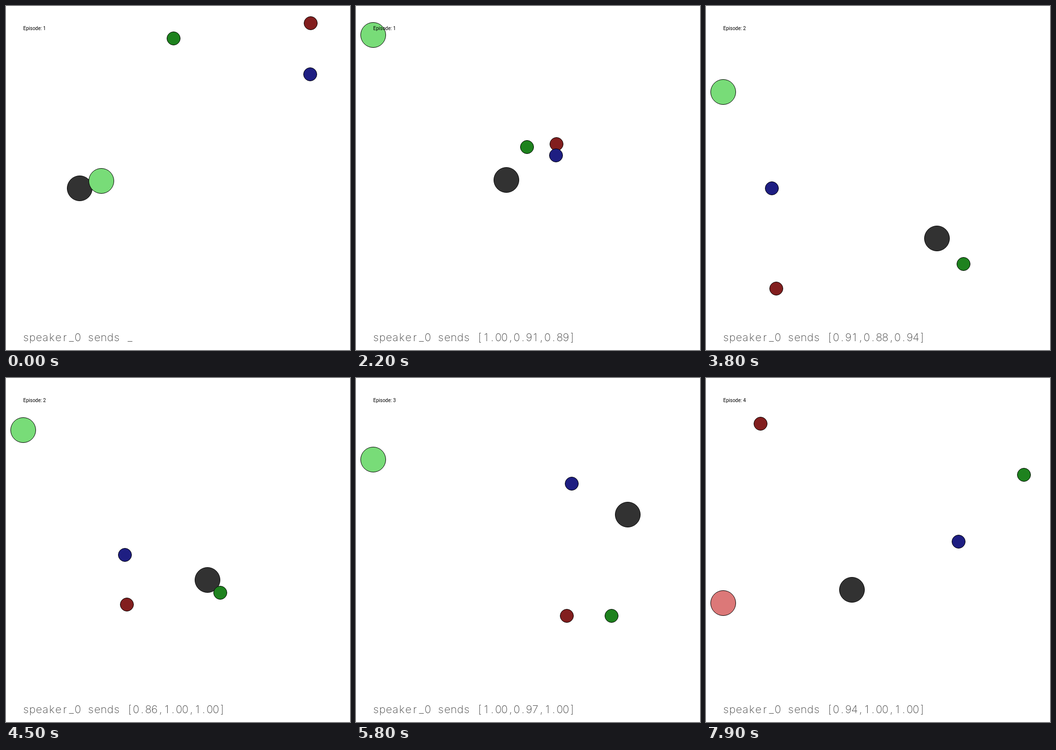
Animation, 700 px wide and 700 px high, one loop 8000 ms. Source, as an HTML page with a canvas:

```html
<!DOCTYPE html>
<html lang="en">
<head>
<meta charset="utf-8">
<title>Speaker and listener</title>
<style>
html, body { margin: 0; width: 100%; height: 100%; overflow: hidden; background: #fff; }
canvas { display: block; }
</style>
</head>
<body>
<canvas id="stage" width="700" height="700"></canvas>
<script>
const ctx = document.getElementById('stage').getContext('2d');
const STEP = 100, STEPS = 25, LOOP = 8000, HALF = 350, DRAG = .83;
const RED = '#821e1e', GREEN = '#1e821e', BLUE = '#1e1e82', DARK = '#323232';
const LIME = '#78dc78', PINK = '#dc7878';

// start and push move the listener; the message drifts between the two ends of voice
const episodes = [
  { color: LIME, speaker: [-221.5, 24.5], red: [300.9, -350], green: [-8.9, -314.5], blue: [299.5, -233.5],
    start: [-172.5, 7.5], push: [-83.9, -86.9], voice: [[.92, .94, .89], [1.01, .91, .89]] },
  { color: LIME, speaker: [188.5, 192.5], red: [-320.5, 350], green: [272.2, 272.8], blue: [-333.5, 34.5],
    start: [142.9, 355.5], push: [-73.9, -73.2], voice: [[1, .66, .82], [.83, 1.07, 1.04]] },
  { color: LIME, speaker: [350, -122], red: [136.8, 231], green: [292.9, 231], blue: [153.8, -230.3],
    start: [-220.5, 16.5], push: [-76, -78.5], voice: [[1, .97, 1], [1, .97, 1]] },
  { color: PINK, speaker: [-60.8, 96], red: [-279.7, -300.8], green: [350, -178.7], blue: [194, -18.5],
    start: [-262.4, 235], push: [-75, -75], voice: [[.94, 1, 1], [.94, 1, 1]] }
];

// Distance covered after n steps of constant push, easing up to full speed
const glide = n => n - DRAG / (1 - DRAG) * (1 - DRAG ** n);

function message([from, to], n) {
  if (n === 0) return '_';
  const values = from.map((v, i) => Math.min(1, v + (to[i] - v) * n / (STEPS - 1)));
  return '[' + values.map(v => v.toFixed(2)).join(',') + ']';
}

// Positions snap to whole units, then shrink to leave a margin
const place = v => Math.floor(HALF + Math.floor(v + 1e-6) * .9 + 1e-6);

function disc([x, y], r, color, zoom) {
  ctx.beginPath();
  ctx.arc(place(x * zoom), place(y * zoom), r - .5, 0, 2 * Math.PI);
  ctx.fillStyle = color;
  ctx.fill();
  ctx.strokeStyle = '#000';
  ctx.lineWidth = 1;
  ctx.stroke();
}

// Light lettering on a fixed-pitch grid
function gridText(text, x, y, pitch) {
  ctx.font = '200 22px Inter, "Open Sans", sans-serif';
  ctx.textAlign = 'center';
  ctx.fillStyle = '#444';
  [...text].forEach((c, i) => ctx.fillText(c, x + (i + .5) * pitch, y));
}

function draw(now) {
  const tick = Math.floor(now % LOOP / STEP);
  const index = Math.floor(tick / STEPS), n = tick % STEPS;
  const { color, speaker, red, green, blue, start, push, voice } = episodes[index];
  const listener = start.map((v, i) => v + push[i] * glide(n));
  // The camera zooms out to keep everything in view
  const reach = Math.max(...[speaker, listener, red, green, blue].flat().map(Math.abs));
  const zoom = HALF / reach;

  ctx.fillStyle = '#fff';
  ctx.fillRect(0, 0, 700, 700);
  disc(speaker, 26, DARK, zoom);
  gridText('speaker_0 sends', 34, 682, 13.2);
  gridText(message(voice, n), 246, 682, 12.5);
  disc(listener, 26, color, zoom);
  disc(red, 14, RED, zoom);
  disc(green, 14, GREEN, zoom);
  disc(blue, 14, BLUE, zoom);

  ctx.font = '10px Roboto, "Liberation Sans", sans-serif';
  ctx.textAlign = 'left';
  ctx.fillStyle = '#000';
  ctx.fillText('Episode: ' + (index + 1), 35, 49);
}

const begin = performance.now();
function frame() {
  draw(performance.now() - begin);
  requestAnimationFrame(frame);
}
frame();
</script>
</body>
</html>
```
